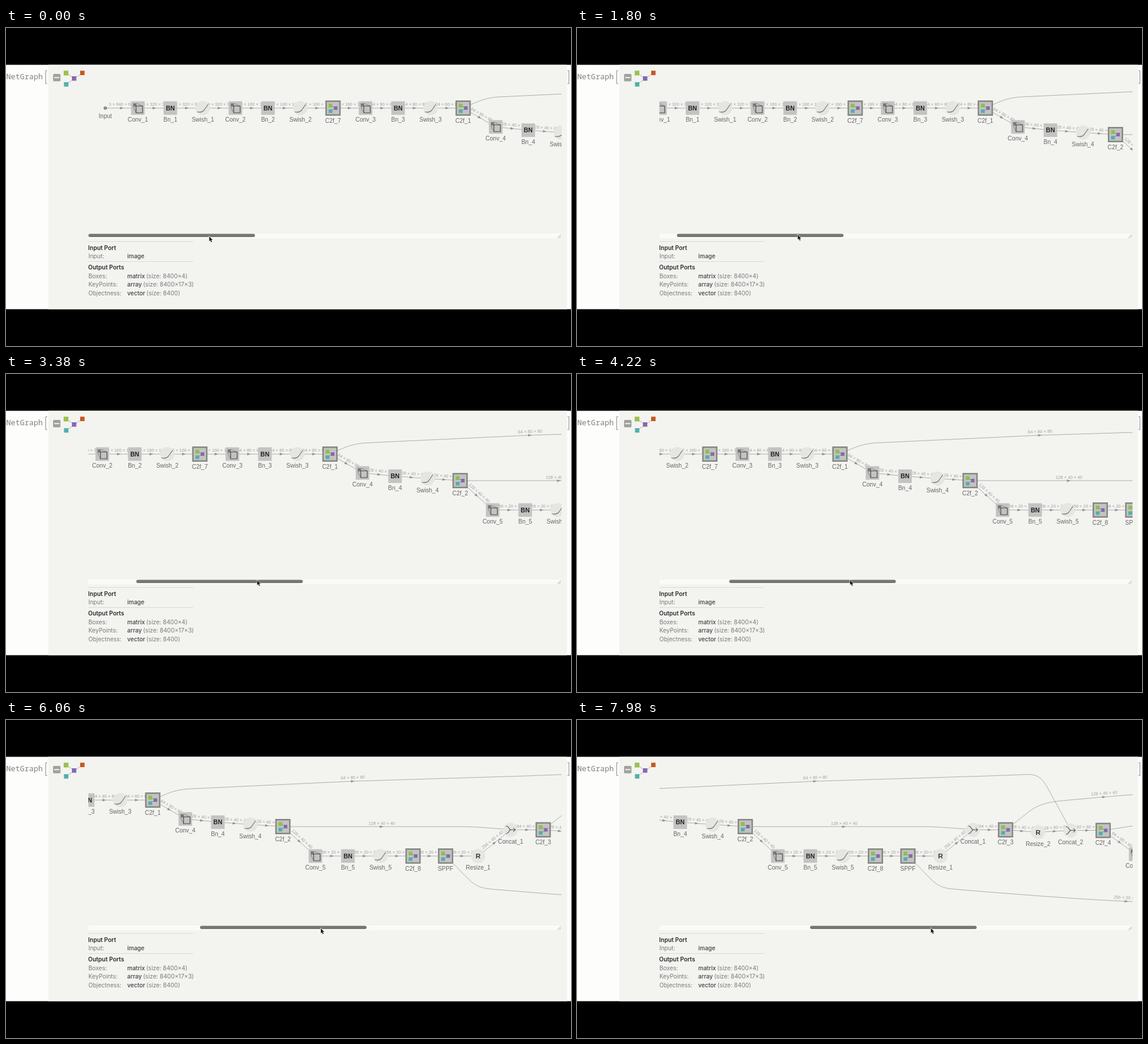
Write an HTML page with a canvas that moves like this. It is 960 px wide and 540 px high and loops after 8000 ms.

```html
<!DOCTYPE html>
<html lang="en">
<head>
<meta charset="utf-8">
<title>Network graph scroll</title>
<style>
html, body { margin: 0; width: 100%; height: 100%; overflow: hidden; background: #000; }
canvas { display: block; width: 100%; height: 100%; }
</style>
</head>
<body>
<canvas id="stage" width="960" height="540"></canvas>
<script>
const ctx = document.getElementById('stage').getContext('2d');
const LOOP = 8000;
const SANS = '"Liberation Sans", Arial, sans-serif';
const UI = 'Inter, "Open Sans", sans-serif';
const MONO = '"Noto Sans Mono", monospace';
const COL = {
  paper: '#fdfdfb', panel: '#f3f3f0', line: '#adadb2', dim: '#a0a0a3',
  label: '#66666a', dark: '#2a2a2c', box: '#c3c3c2', frame: '#878782',
  disc: '#e5e5e2', green: '#92bd4e', purple: '#8668b0', teal: '#50b0ad', orange: '#c8581e'
};

// Column pitch of the graph; each node is [name, y, tensor shape leaving it].
const X0 = 168.7, PITCH = 55.28;
const S320 = '16 × 320 × 320', S160 = '32 × 160 × 160', S80 = '64 × 80 × 80';
const S40 = '128 × 40 × 40', S20 = '256 × 20 × 20';
const nodes = [
  ['Input', 136, '3 × 640 × 640'],
  ['Conv_1', 136, S320], ['Bn_1', 136, S320], ['Swish_1', 136, S320],
  ['Conv_2', 136, S160], ['Bn_2', 136, S160], ['Swish_2', 136, S160], ['C2f_7', 136, S160],
  ['Conv_3', 136, S80], ['Bn_3', 136, S80], ['Swish_3', 136, S80], ['C2f_1', 136, S80],
  ['Conv_4', 168, S40], ['Bn_4', 173.5, S40], ['Swish_4', 177.5, S40], ['C2f_2', 181, S40],
  ['Conv_5', 231, S20], ['Bn_5', 231, S20], ['Swish_5', 231, S20], ['C2f_8', 231, S20],
  ['SPPF', 231, S20], ['Resize_1', 231, '256 × 40 × 40'],
  ['Concat_1', 186.5, '384 × 40 × 40'], ['C2f_3', 186.5, S40],
  ['Resize_2', 190.5, '128 × 80 × 80'], ['Concat_2', 187.5, '192 × 80 × 80'],
  ['C2f_4', 187.5, S80], ['Conv_6', 228, S40]
].map(([name, y, shape], i) => ({ name, y, shape, x: X0 + PITCH * i }));

// Skip connections, with an optional label and arrow.
const skips = [
  { d: 'M777 136L792 129C808 122 820 118 838 117L1116 104L1410 95L1476 92.5C1494 92 1502 98 1512 116L1551 187',
    shape: S80, x: 1116, y: 104, a: -0.04 },
  { d: 'M998 181H1295C1325 181 1340 183 1385 186', shape: S40, x: 1165, y: 181.3, a: 0 },
  { d: 'M1275 231L1314 271C1330 286 1340 286 1362 288Q1540 303 1645 308L1800 312',
    shape: S20, x: 1645, y: 308, a: 0.05 },
  { d: 'M1441 186.5L1478 157C1500 140 1518 139 1548 136L1607 130.7L1800 115',
    shape: S40, x: 1607, y: 130.7, a: -0.07 },
  { d: 'M1606 187.5L1665 178.5' }
].map(s => ({ ...s, path: new Path2D(s.d) }));

// Scroll offset of the graph and cursor height, by step number.
const scrollKeys = [[0, 0], [22, 45.5], [53, 127.3], [91, 330], [111, 433.5], [150, 621.8], [171, 712]];
const cursorKeys = [[0, 354], [22, 352.5], [53, 350.5], [91, 350], [111, 352], [150, 355], [171, 353.5]];
const BAR_RATIO = 2.781;

// Steps come in groups of three, held 20, 100 and 20 ms.
function stepAt(ms) {
  const group = Math.floor(ms / 140), rest = ms % 140;
  return group * 3 + (rest < 20 ? 0 : rest < 120 ? 1 : 2);
}

// Monotone cubic through the keys, starting from rest.
function smooth(keys, x) {
  const last = keys.length - 1;
  let i = 0;
  while (i < last - 1 && x > keys[i + 1][0]) i++;
  const secant = k => (keys[k + 1][1] - keys[k][1]) / (keys[k + 1][0] - keys[k][0]);
  const slope = k => {
    if (k === 0) return 0;
    if (k === last) return secant(k - 1);
    const a = secant(k - 1), b = secant(k);
    return a * b > 0 ? 2 * a * b / (a + b) : 0;
  };
  const [xa, ya] = keys[i], [xb, yb] = keys[i + 1];
  const h = xb - xa, u = (x - xa) / h, v = 1 - u;
  return v * v * (1 + 2 * u) * ya + u * u * (3 - 2 * u) * yb
    + u * v * h * (v * slope(i) - u * slope(i + 1));
}

function rect(x, y, w, h, color) {
  ctx.fillStyle = color;
  ctx.fillRect(x, y, w, h);
}

function disc(x, y, r, color) {
  ctx.fillStyle = color;
  ctx.beginPath();
  ctx.arc(x, y, r, 0, Math.PI * 2);
  ctx.fill();
}

function stroke(d, color, width = 1) {
  ctx.strokeStyle = color;
  ctx.lineWidth = width;
  ctx.stroke(typeof d === 'string' ? new Path2D(d) : d);
}

function text(str, x, y, font, color, align = 'left') {
  ctx.font = font;
  ctx.fillStyle = color;
  ctx.textAlign = align;
  ctx.fillText(str, x, y);
}

function at(x, y, angle, draw) {
  ctx.save();
  ctx.translate(x, y);
  ctx.rotate(angle);
  draw();
  ctx.restore();
}

function edgeMark(x, y, angle, shape) {
  at(x, y, angle, () => {
    text(shape, 1, -3.8, '7.3px ' + SANS, COL.dim, 'center');
    ctx.fillStyle = '#929294';
    ctx.fill(new Path2D('M-2.5 -2.2L3.5 0L-2.5 2.2Z'));
  });
}

const icons = {
  Input() {
    disc(0, 0, 2.8, '#747474');
    disc(0, 0, 1.3, '#b0b0b0');
  },
  Conv() {
    rect(-11.5, -11.5, 23, 23, COL.box);
    stroke('M-8 -8L-3 -3.5M-2.5 -8L8 -3.5M-8 -2.5L-3 8', '#757575', 0.8);
    rect(-8, -8, 5.5, 5.5, '#787876');
    stroke('M-3 -3.5H8V8H-3Z', '#4a4a48', 1.2);
  },
  Bn() {
    rect(-11.5, -11.5, 23, 23, COL.box);
    text('BN', 0, 3.8, 'bold 10.5px ' + SANS, '#222224', 'center');
  },
  Swish() {
    disc(0, 0, 12, COL.disc);
    stroke('M-10 6.5C-5 7.5 -1 7 2 3.5L9 -6.5', '#737372', 1.2);
  },
  C2f() {
    rect(-13, -13, 26, 26, COL.frame);
    rect(-10.5, -10.5, 21, 21, COL.box);
    stroke('M-4 -4.5L4.5 0L-4 5', '#838383', 0.8);
    rect(-7.5, -7.5, 6.5, 6.5, COL.green);
    rect(1.5, -3, 6, 6, COL.purple);
    rect(-7.5, 2.2, 6.5, 6, COL.teal);
  },
  Resize() {
    disc(0, 0, 12, COL.disc);
    text('R', 0, 4, 'bold 11.5px ' + SANS, '#363638', 'center');
  },
  Concat() {
    disc(0, 0, 12, COL.disc);
    stroke('M-8 -6.5C-2 -6.5 -4 0 1 0H8M-8 6.5C-2 6.5 -4 0 1 0M4.5 -3.2L8 0L4.5 3.2', '#5a5a5a', 1.1);
  }
};
icons.SPPF = icons.C2f;

function drawGraph(shift) {
  ctx.save();
  ctx.beginPath();
  ctx.rect(140, 64, 804, 284);
  ctx.clip();
  ctx.translate(-shift, 0);
  for (const s of skips) {
    stroke(s.path, COL.line, 1);
    if (s.shape) edgeMark(s.x, s.y, s.a, s.shape);
  }
  nodes.slice(1).forEach((b, i) => {
    const a = nodes[i];
    stroke(`M${a.x} ${a.y}L${b.x} ${b.y}`, COL.line, 1);
    edgeMark((a.x + b.x) / 2, (a.y + b.y) / 2, Math.atan2(b.y - a.y, b.x - a.x), a.shape);
  });
  for (const n of nodes) {
    const kind = n.name.split('_')[0];
    at(n.x, n.y, 0, icons[kind]);
    const drop = kind === 'Input' ? 16.5 : icons[kind] === icons.C2f ? 24.5 : 23.3;
    text(n.name, n.x, n.y + drop, '10px ' + SANS, COL.label, 'center');
  }
  ctx.restore();
}

function drawHeader() {
  text('NetGraph', 0.5, 87, '12.9px ' + MONO, '#80807c');
  stroke('M70 72.5H67.5V94.5H70M954 72.5H956.5V94.5H954', '#8c8c8a', 1);
  ctx.fillStyle = '#a0a09c';
  ctx.beginPath();
  ctx.roundRect(80, 78, 12.5, 12.5, 1.5);
  ctx.fill();
  rect(82, 83.2, 8.5, 2, '#f1f1ee');
  stroke('M102 76L116 86L102 96M116 86L130 76', '#b4b4b2', 1);
  rect(98, 72.5, 8, 8, '#9cc04e');
  rect(126, 72.5, 7.5, 7.5, COL.orange);
  rect(112, 82, 7.5, 7.5, COL.purple);
  rect(98.5, 92, 7.5, 7.5, COL.teal);
}

function drawPorts() {
  stroke('M140 362.5H318M140 396.5H318', '#d9d9d6', 1);
  const head = '600 10px ' + UI, plain = '10px ' + UI;
  text('Input Port', 139.5, 376.5, head, COL.dark);
  text('Output Ports', 139.5, 410.2, head, COL.dark);
  const rows = [
    ['Input:', 'image', '', 391],
    ['Boxes:', 'matrix', '(size: 8400×4)', 424.5],
    ['KeyPoints:', 'array', '(size: 8400×17×3)', 439.3],
    ['Objectness:', 'vector', '(size: 8400)', 454.3]
  ];
  for (const [name, type, size, y] of rows) {
    text(name, 140, y, plain, '#7a7a7c');
    text(type, 206, y, '500 10px ' + UI, '#404044');
    text(size, 208.2 + ctx.measureText(type).width, y, plain, '#7a7a7c');
  }
}

function drawScrollbar(left) {
  rect(140, 349, 804, 8, '#fafaf8');
  ctx.fillStyle = '#777771';
  ctx.beginPath();
  ctx.roundRect(left, 349.5, 283, 5.5, 2.75);
  ctx.fill();
  stroke('M937 356.5L943 350.5M940 356.5L943 353.5', '#a8a8a6', 1);
}

function drawCursor(x, y) {
  at(x, y, 0, () => {
    const arrow = new Path2D('M0 0V8L1.8 6.5L3.2 9.7L4.7 9L3.3 5.9H5.7Z');
    stroke(arrow, '#f4f4f2', 1.2);
    ctx.fillStyle = '#1a1a1a';
    ctx.fill(arrow);
  });
}

function draw(ms) {
  const step = stepAt(ms), shift = smooth(scrollKeys, step);
  const left = 140 + shift / BAR_RATIO;
  rect(0, 0, 960, 540, '#000');
  rect(0, 62.5, 960, 415, COL.paper);
  rect(72, 62.5, 881, 415, COL.panel);
  drawHeader();
  drawGraph(shift);
  drawScrollbar(left);
  drawPorts();
  drawCursor(left + 205.3, smooth(cursorKeys, step));
}

function tick() {
  draw(performance.now() % LOOP);
  requestAnimationFrame(tick);
}
tick();
</script>
</body>
</html>
```
